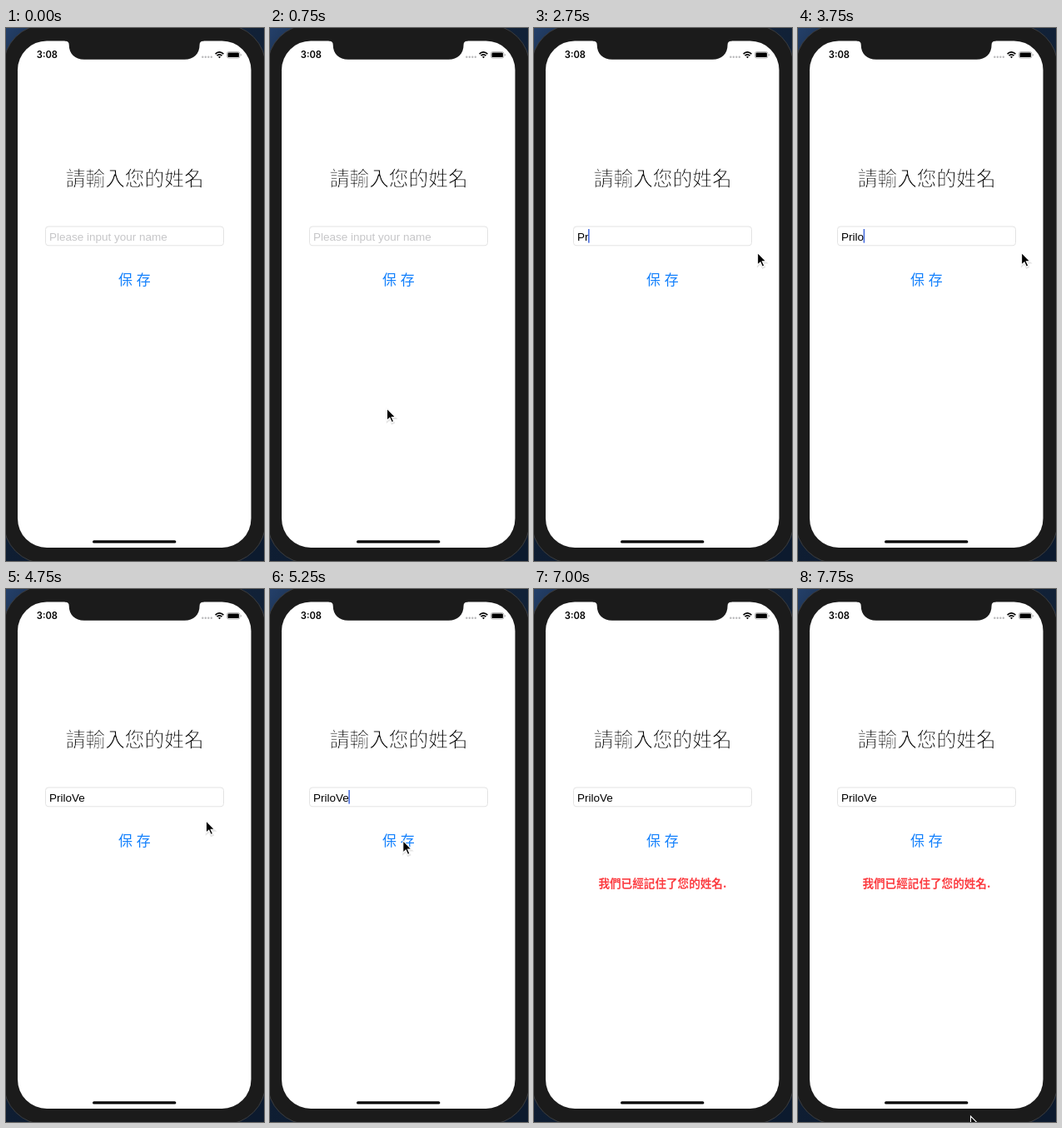
These frames come from a looping animation (310x639 px, 8000 ms). An HTML page:

```html
<!DOCTYPE html>
<html lang="zh-Hant">
<head>
<meta charset="utf-8">
<title>Name form</title>
<style>
  html, body { margin: 0; width: 100%; height: 100%; overflow: hidden; background: #1b1b1b; }
  svg { display: block; width: 310px; height: 639px; }
  text { white-space: pre; }
  .cjk { font-family: "Noto Sans CJK TC", "Noto Sans CJK", sans-serif; text-anchor: middle; }
  .title { font-size: 23.7px; stroke: #fff; stroke-width: .8px; }
  .save { font-size: 17px; word-spacing: 1px; fill: #107ffc; }
  .saved { font-size: 13.6px; font-weight: 700; fill: #fc3d42; }
  .input { font: 13.5px "Liberation Sans", sans-serif; }
  .clock { font: 600 11.2px Inter, sans-serif; }
</style>
</head>
<body>
<svg viewBox="0 0 310 639">
  <defs>
    <linearGradient id="wall" x1="0" y1="0" x2=".6" y2="1">
      <stop offset="0" stop-color="#24406a"/>
      <stop offset=".12" stop-color="#14253c"/>
      <stop offset="1" stop-color="#0c1a2e"/>
    </linearGradient>
    <path id="arrow" d="M0 0V14.5L3.4 11.4L5.8 16.8L8.2 15.7L5.8 10.5H10.3Z"/>
  </defs>

  <!-- phone -->
  <rect width="310" height="639" fill="url(#wall)"/>
  <rect x="-3" y="-4" width="315" height="646" rx="50" fill="#1b1b1b" stroke="#3b3d40"/>
  <rect x="14" y="15.4" width="280.5" height="607.6" rx="35" fill="#fff"/>
  <path d="M70.7 14V15.4Q75.7 15.4 75.7 20C75.7 31 83 37.8 94 37.8H214.5C225.5 37.8 232.6 31 232.6 20Q232.6 15.4 237.6 15.4V14Z" fill="#1b1b1b"/>

  <!-- status bar -->
  <text class="clock" x="36.8" y="36">3:08</text>
  <path d="M236.3 34.8h10.6" stroke="#b9b9bb" stroke-width="2.4" stroke-linecap="round" stroke-dasharray="0 3.5"/>
  <path d="M251.6 31.2Q256.5 26.7 261.4 31.2M253.5 33.2Q256.5 30.5 259.5 33.2" fill="none" stroke="#000" stroke-width="1.7"/>
  <path d="M254.9 34.5Q256.5 33.3 258.1 34.5L256.5 36.2Z"/>
  <rect x="265.5" y="28.5" width="15.4" height="7.6" rx="2.2" fill="none" stroke="#a5a5a5" stroke-width=".8"/>
  <rect x="266.5" y="29.5" width="13.4" height="5.6" rx="1.2"/>
  <path d="M281.9 31V33.6Q283 33.2 283 32.3T281.9 31Z" fill="#a5a5a5"/>

  <!-- form -->
  <text class="cjk title" x="154.7" y="189">請輸入您的姓名</text>
  <rect x="47.5" y="238" width="214" height="22.8" rx="3.5" fill="#fff" stroke="#e0e0e0" stroke-width=".9"/>
  <text id="hint" class="input" x="52" y="254.6" fill="#c6c6c8">Please input your name</text>
  <text id="typed" class="input" x="52" y="254.6"></text>
  <rect id="caret" y="241" width="1.5" height="16.6" fill="#4168dc"/>
  <text class="cjk save" x="154.4" y="308">保 存</text>
  <text id="saved" class="cjk saved" x="154.4" y="358">我們已經記住了您的姓名.</text>
  <rect x="104" y="614.2" width="100.4" height="3.4" rx="1.7"/>

  <g id="mouse">
    <use href="#arrow" x=".3" y="1.5" stroke="#000" stroke-width="2" opacity=".1"/>
    <use href="#arrow" stroke="#fff" stroke-width="1.1"/>
  </g>
</svg>
<script>
const LOOP = 8000, STEP = 250, NAME = "PriloVe";
const [hint, typed, caret, saved, mouse] =
  ["hint", "typed", "caret", "saved", "mouse"].map(id => document.getElementById(id));

// Pointer glides, in order
const moves = [
  { at: 250, dur: 1000, x: 96, y: 252 },   // to the field
  { at: 1750, dur: 750, x: 268.6, y: 269.4 }, // aside
  { at: 4500, dur: 750, x: 159.8, y: 301.6 }, // to the button
  { at: 5750, dur: 500, x: 159, y: 716 },  // out below
  { at: 7250, dur: 1000, x: 256, y: 548 }  // back in
];

const clamp = (v, lo, hi) => Math.min(hi, Math.max(lo, v));
const ease = k => k * k * (3 - 2 * k);

function pointer(t) {
  let x = 185, y = 660;
  for (const m of moves) {
    const k = ease(clamp((t - m.at) / m.dur, 0, 1));
    x += (m.x - x) * k;
    y += (m.y - y) * k;
  }
  return [x, y];
}

// Letters typed by a burst of keys
const burst = (t, from, max) => clamp(Math.floor((t - from) / 180) + 1, 0, max);

function caretOn(t) {
  const typing = t >= 2500 && t <= 4500;
  const phase = t % 1000;
  return t >= 1500 && (typing || phase >= 250 && phase < 750);
}

const show = (el, on) => el.setAttribute("visibility", on ? "visible" : "hidden");

function draw(ms) {
  const t = Math.floor(ms % LOOP / STEP) * STEP;
  const count = burst(t, 2500, 5) + burst(t, 4000, 2);
  typed.textContent = NAME.slice(0, count);
  caret.setAttribute("x", 52 + (count ? typed.getComputedTextLength() - 0.4 : 0));
  mouse.setAttribute("transform", `translate(${pointer(t)})`);
  show(hint, !count);
  show(caret, caretOn(t));
  show(saved, t >= 5750);
}

const start = performance.now();
function tick() {
  draw(performance.now() - start);
  requestAnimationFrame(tick);
}
tick();
</script>
</body>
</html>
```
